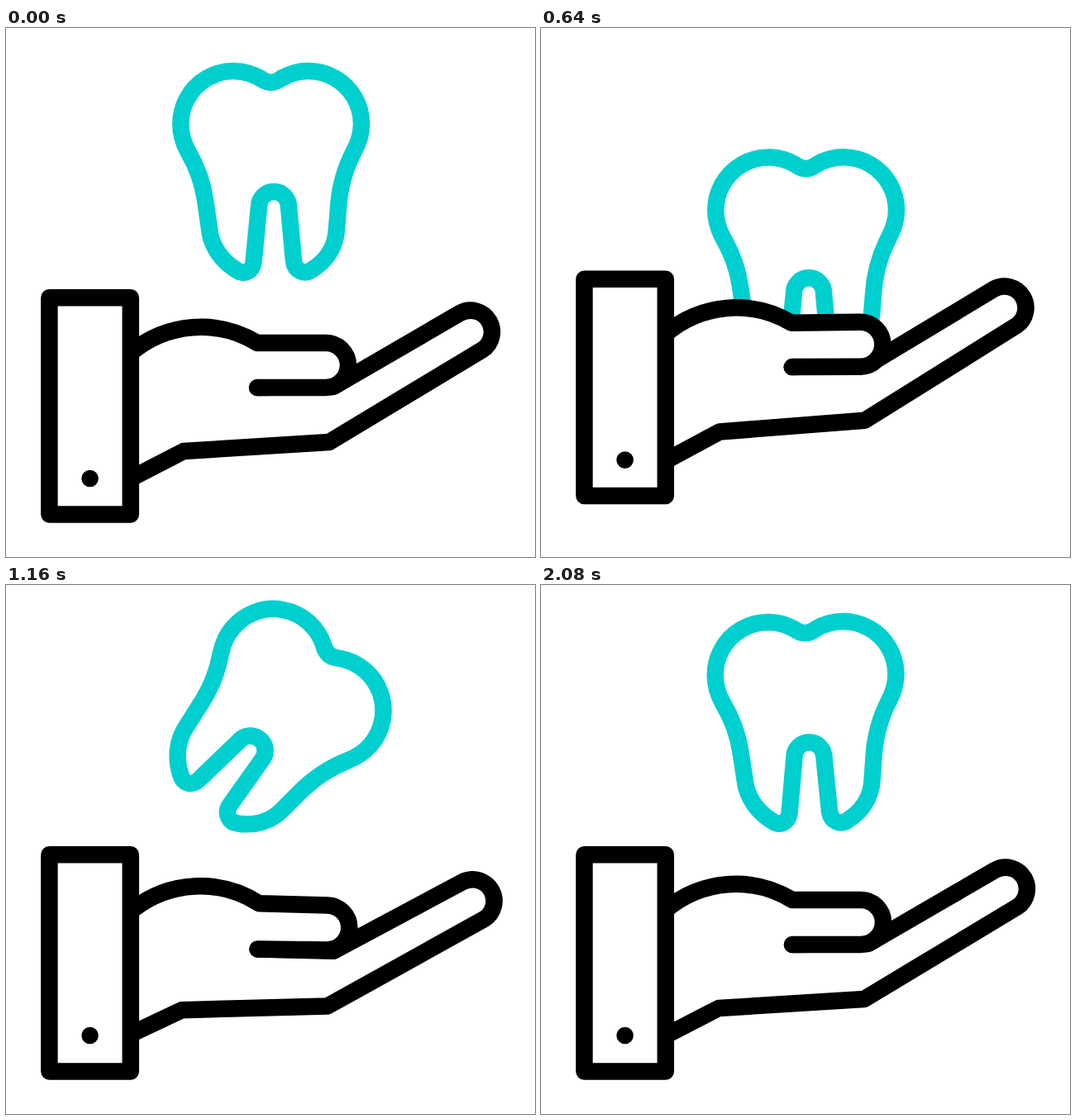
An HTML page that plays this animation: 640 by 640 pixels, repeating every 2.12 s.

```html
<!DOCTYPE html>
<html lang="en">
<head>
<meta charset="utf-8">
<title>Tooth toss</title>
<style>
  html, body { margin: 0; height: 100%; overflow: hidden; background: #fff; }
  svg { display: block; width: 100vw; height: 100vh; }
  svg * { stroke-linecap: round; stroke-linejoin: round; }
</style>
</head>
<body>
<svg viewBox="0 0 640 640" fill="#fff" stroke="#000" stroke-width="20.5">
  <path id="tooth" fill="none" stroke="#00cfcf" d="M307 60.5A64 64 0 0 0 211.3 116
    C211.3 128 214.5 139 220 149C231 168 238 187 241 208L246 243
    C248 264 261 282 279 293C288 299 298 295 299.5 283L306 216
    A18 18 0 0 1 342 216L348 282C349.5 294 361 299 370 292.5
    C387 282 399 265 400 243L402 218C403.5 193 410 170 421 149
    C426.5 139 430 128 430 116A64 64 0 0 0 334 60.5L330 63Q320.5 68.5 311 63Z"/>
  <g id="arm">
    <g id="hand">
      <path stroke="none" d="M151 393L304 425V445L151 545Z"/>
      <path d="M304 435L396 434L549.8 344.7A26 26 0 0 1 576.4 389.3L391 501L215 512L151 545"/>
      <path id="thumb"/>
    </g>
    <rect x="52.4" y="326.2" width="98.4" height="262.3"/>
    <circle cx="101.6" cy="545" r="10.3" fill="#000" stroke="none"/>
  </g>
</svg>
<script>
  const LOOP = 2120, STEP = 40;
  const [tooth, arm, hand, thumb] = ['tooth', 'arm', 'hand', 'thumb'].map(id => document.getElementById(id));

  // Keys are [time, value]; the arm moves first, hand and thumb follow later.
  const armKeys = [[200, 0], [440, 27], [700, -29.5], [1120, 0]];
  const handKeys = [[240, 0], [470, 5.3], [760, -4.55], [1080, 2.7], [1320, 0]];
  const thumbKeys = [[260, 0], [500, 12.5], [820, -16], [1040, 0], [1420, -8.3], [1680, 0]];

  function track(keys, t) {
    if (t <= keys[0][0]) return keys[0][1];
    for (let i = 1; i < keys.length; i++) {
      const [t0, a] = keys[i - 1], [t1, b] = keys[i];
      if (t < t1) return a + (b - a) * (1 - Math.cos(Math.PI * (t - t0) / (t1 - t0))) / 2;
    }
    return keys[keys.length - 1][1];
  }

  function toothY(t) {
    if (t < 440) return 195 * (t / 440) ** 1.6;
    const u = Math.min(1, (t - 440) / 760);
    return -7.6 + 202.6 * (1 - u) ** 4.5 * (1 + 4.5 * u);
  }

  // Two turns that slow down until the loop ends.
  function toothAngle(t) {
    const left = Math.min(1, (LOOP - t) / 1480);
    return -720 * left ** 2 * (1.075 - 0.075 * left ** 3);
  }

  function thumbPath(k) {
    const base = [304 + 0.15 * k, 381 + 0.62 * k];
    const top = [387 + 0.2 * k, 381 + k];
    const low = [387 - 0.1 * k, 435 + k];
    return `M151 393A131 131 0 0 1 ${base}L${top}A27 27 0 0 1 ${low}L304 435`;
  }

  function draw(t) {
    tooth.setAttribute('transform', `translate(0 ${toothY(t)}) rotate(${toothAngle(t)} 320.5 173.5)`);
    arm.setAttribute('transform', `translate(0 ${track(armKeys, t)})`);
    hand.setAttribute('transform', `rotate(${track(handKeys, t)} 152 449)`);
    thumb.setAttribute('d', thumbPath(track(thumbKeys, t)));
  }

  let start;
  function tick(now) {
    start ??= now;
    draw(Math.floor((now - start) % LOOP / STEP) * STEP);
    requestAnimationFrame(tick);
  }
  draw(0);
  requestAnimationFrame(tick);
</script>
</body>
</html>
```
